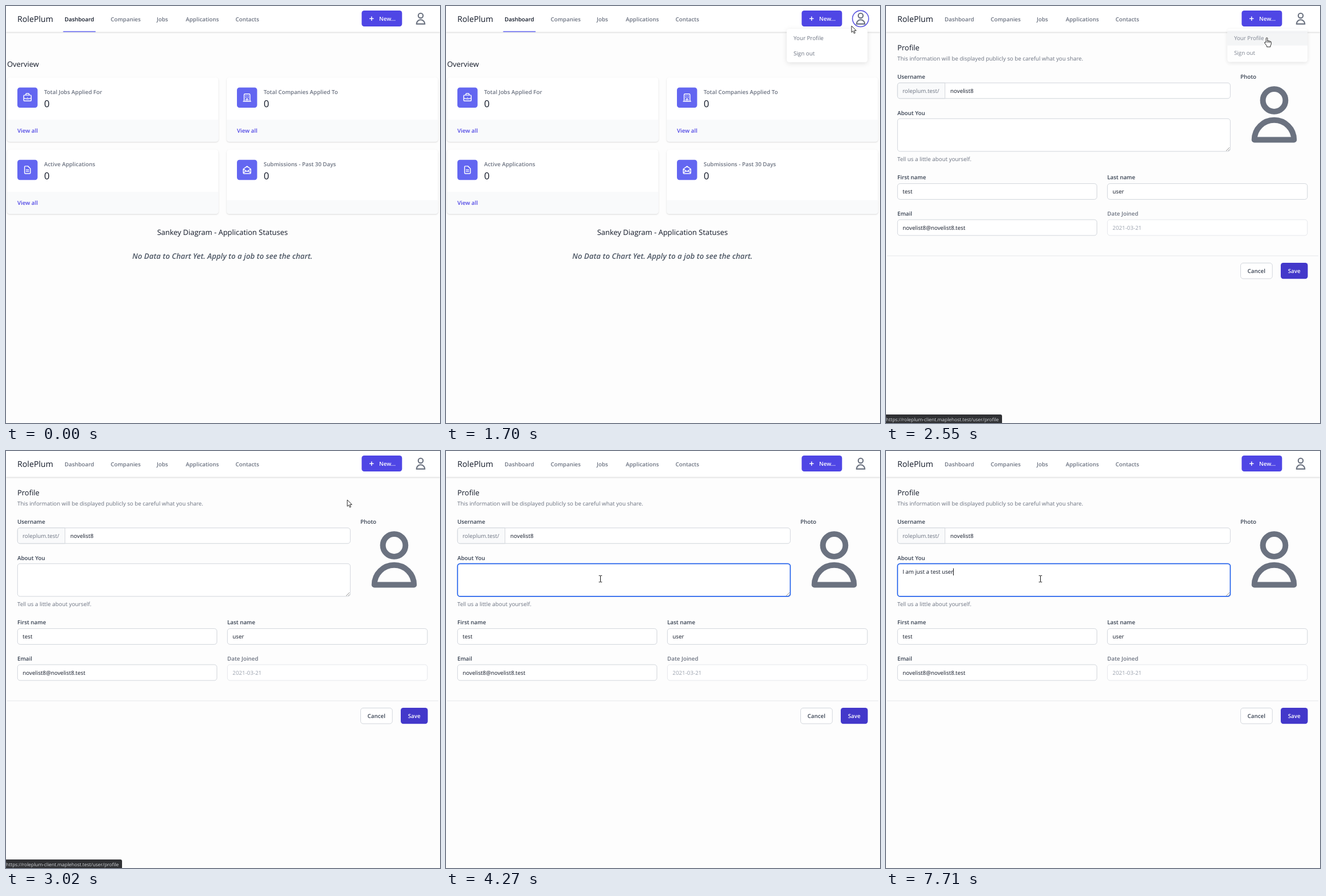
An HTML page that plays this animation: 763 by 734 pixels, repeating every 8000 ms.

```html
<!DOCTYPE html>
<html lang="en">
<head>
<meta charset="utf-8">
<title>Job tracker profile</title>
<style>
  html, body { margin: 0; width: 100%; height: 100%; overflow: hidden; background: #fdfdfd; }
  svg { display: block; }
  text { font: 400 9.8px "Open Sans", "Noto Sans", sans-serif; fill: #111827; text-rendering: geometricPrecision; }
  .label { font-weight: 600; font-size: 9.82px; fill: #374151; }
  .muted { fill: #6b7280; }
  .faint { fill: #9ca3af; }
  .dark { fill: #111827; }
  .link { fill: #4f46e5; }
  .light { fill: #fff; }
  .head { font-weight: 500; font-size: 12.95px; }
  .brand { font-weight: 500; font-size: 14.2px; }
  .count { font-weight: 500; font-size: 16.8px; }
  .empty { font-weight: 600; font-style: italic; font-size: 13.3px; fill: #4b5563; }
  .url { font-size: 8.45px; fill: #d5d8dc; }
  .mid { text-anchor: middle; }
  .card { filter: drop-shadow(0 1px 1px rgba(0,0,0,.14)); }
  .popup { filter: drop-shadow(0 2px 4px rgba(0,0,0,.11)); }
  .icon { fill: none; stroke-width: 2; stroke-linecap: round; stroke-linejoin: round; }
</style>
</head>
<body>
<svg id="stage" width="763" height="734" viewBox="0 0 763 734"></svg>
<script>
const LOOP = 8000;
const stage = document.getElementById('stage');

const text = (x, y, str, cls = '') => `<text x="${x}" y="${y}" class="${cls}">${str}</text>`;
const box = (x, y, w, h, fill, r = 0, stroke = 'none') =>
  `<rect x="${x}" y="${y}" width="${w}" height="${h}" rx="${r}" fill="${fill}" stroke="${stroke}"/>`;
const icon = (x, y, scale, d, color) =>
  `<path class="icon" transform="translate(${x} ${y}) scale(${scale})" stroke="${color}" d="${d}"/>`;

const ICONS = {
  user: 'M16 7a4 4 0 1 1-8 0 4 4 0 0 1 8 0zM12 14a7 7 0 0 0-7 7h14a7 7 0 0 0-7-7z',
  briefcase: 'M21 13.25A24 24 0 0 1 12 15a24 24 0 0 1-9-1.75M16 6V4a2 2 0 0 0-2-2h-4a2 2 0 0 0-2 2v2m4 6h.01M5 20h14a2 2 0 0 0 2-2V8a2 2 0 0 0-2-2H5a2 2 0 0 0-2 2v10a2 2 0 0 0 2 2z',
  building: 'M19 21V5a2 2 0 0 0-2-2H7a2 2 0 0 0-2 2v16M3 21h18M9 7h1m-1 4h1m4-4h1m-1 4h1m-5 10v-5a1 1 0 0 1 1-1h2a1 1 0 0 1 1 1v5',
  document: 'M9 12h6m-6 4h6m2 5H7a2 2 0 0 1-2-2V5a2 2 0 0 1 2-2h6l6 6v10a2 2 0 0 1-2 2z',
  mail: 'M3 19v-9l9-6.6 9 6.6v9a2 2 0 0 1-2 2H5a2 2 0 0 1-2-2l6.75-4.5M21 19l-6.75-4.5M3 10l9 6 9-6'
};

function card(x, y, glyph, title, footer) {
  const h = 113.3, w = 371.5, f = y + footer;
  return `<g class="card">${box(x, y, w, h, '#fff', 5)}
    <path d="M${x} ${f}h${w}V${y + h - 5}q0 5-5 5H${x + 5}q-5 0-5-5z" fill="#f9fafb"/></g>`
    + box(x + 18, y + 18, 35.5, 35.5, '#6366f1', 4.5)
    + icon(x + 27, y + 27, .73, ICONS[glyph], '#fff')
    + text(x + 65, y + 29.5, title, 'label muted')
    + text(x + 65, y + 52, '0', 'count')
    + (footer < 80 ? text(x + 18, y + 97.5, 'View all', 'label link') : '');
}

function field(x, y, w, label, value, disabled) {
  return text(x, y - 7, label, disabled ? 'label muted' : 'label')
    + box(x + .3, y + .3, w, 27.8, '#fff', 4.5, disabled ? '#e5e7eb' : '#d1d5db')
    + text(x + 9.3, y + 18, value, disabled ? 'faint' : '');
}

const nav = `<g style="filter:drop-shadow(0 1px 1px rgba(0,0,0,.16))">${box(0, 0, 763, 45.7, '#fff')}</g>`
  + text(20, 28, 'RolePlum', 'brand')
  + [[184, 'Companies'], [265, 'Jobs'], [316, 'Applications'], [403.5, 'Contacts']]
      .map(([x, name]) => text(x, 26.7, name, 'label muted')).join('')
  + '<text id="tab" x="103" y="26.7">Dashboard</text>'
  + `<g id="underline">${box(100.5, 44.3, 57, 1.5, '#6366f1')}</g>`
  + box(625.3, 8, 71, 28, '#4f46e5', 4.5)
  + '<path d="M639 22.2h7.4M642.7 18.5v7.4" stroke="#fff" stroke-width="1.5"/>'
  + text(656, 25.7, 'New...', 'label light')
  + icon(716.4, 9.6, 1.05, ICONS.user, '#6b7280')
  + '<circle id="ring" cx="728.8" cy="22.3" r="14.2" fill="none" stroke="#5b57e0" stroke-width="1.6"/>';

const dashboard = text(2, 107, 'Overview', 'head')
  + card(2, 125.5, 'briefcase', 'Total Jobs Applied For', 74.5)
  + card(388, 125.5, 'building', 'Total Companies Applied To', 74.5)
  + card(2, 252.7, 'document', 'Active Applications', 74.5)
  + card(388, 252.7, 'mail', 'Submissions - Past 30 Days', 89)
  + text(380.5, 403, 'Sankey Diagram - Application Statuses', 'head mid')
  + text(380.5, 444.5, 'No Data to Chart Yet. Apply to a job to see the chart.', 'empty mid');

const profile = text(20, 77.5, 'Profile', 'head')
  + text(20, 95.5, 'This information will be displayed publicly so be careful what you share.', 'muted')
  + text(20, 128, 'Username', 'label')
  + box(20.3, 135.3, 585, 27.5, '#fff', 4.5, '#d1d5db')
  + '<path d="M103.7 135.3H24.8q-4.5 0-4.5 4.5v18.5q0 4.5 4.5 4.5h78.9z" fill="#f9fafb" stroke="#d1d5db"/>'
  + text(29, 152.6, 'roleplum.test/', 'muted')
  + text(113, 152.6, 'novelist8')
  + text(623, 128, 'Photo', 'label')
  + icon(622.8, 131.2, 4.97, ICONS.user, '#6b7280')
  + text(20, 191.5, 'About You', 'label')
  + '<rect id="about" x="20.3" y="198.3" width="585" height="57.6" rx="4.5" fill="#fff"/>'
  + '<path d="M598 255l6-6M601.5 255l2.5-2.5" stroke="#777" stroke-width=".8"/>'
  + '<text id="typed" x="29" y="216.2"></text><path id="caret" d="M0 206.5v12.5" stroke="#111"/>'
  + text(20, 273, 'Tell us a little about yourself.', 'muted')
  + field(20, 312.3, 350.5, 'First name', 'test')
  + field(389, 312.3, 351.5, 'Last name', 'user')
  + field(20, 375.8, 350.5, 'Email', 'novelist8@novelist8.test')
  + field(389, 375.8, 351.5, 'Date Joined', '2021-03-21', true)
  + box(2, 439.3, 758, 1, '#e5e7eb')
  + box(623.5, 452.4, 55.7, 27.6, '#fff', 4.5, '#d1d5db')
  + text(651.3, 470, 'Cancel', 'label mid')
  + box(694, 452, 47.5, 28.2, '#4338ca', 4.5)
  + text(717.7, 470, 'Save', 'label light mid');

const menu = `<g class="popup">${box(599, 40.3, 142, 58.7, '#fff', 4.5)}</g>
  <g id="hover">${box(599, 43.5, 142, 26.3, '#f3f4f6')}</g>`
  + text(611, 60, 'Your Profile', 'muted') + text(611, 86.7, 'Sign out', 'muted');

const status = '<path d="M0 719h201q3 0 3 3v12H0z" fill="#303134"/>'
  + text(0, 730.5, 'https://roleplum-client.maplehost.test/user/profile', 'url');

const pointers = {
  arrow: '<path d="M0 0v11.4l2.6-2.4 1.8 4.2 1.9-.8-1.8-4.1h3.7z" fill="#fff" stroke="#111" stroke-width=".9"/>',
  hand: '<path d="M-1.3 8V1.2q0-1.4 1.3-1.4t1.3 1.4v4.4q1-.9 2.2.2 1.2-.7 2 .4 2.2-.2 2.2 1.8v3.4l-1.4 2.6v2H0v-1.8l-3.8-5q-.6-1.7 1-1.6z" fill="#fff" stroke="#111" stroke-width=".9"/><path d="M1.3 5v4M3.5 6v3M5.5 6.5v2.5" stroke="#111" stroke-width=".7"/>',
  beam: '<path d="M-2.8-5.7H-.8L0-5.2l.8-.5h2M-2.8 5.7h2L0 5.2l.8.5h2M0-5.2V5.2" fill="none" stroke="#111"/>'
};

stage.innerHTML = box(0, 0, 763, 734, '#fdfdfd')
  + `<g id="dashboard">${dashboard}</g><g id="profile">${profile}</g>${nav}
  <g id="menu">${menu}</g><g id="status">${status}</g><g id="cursor">`
  + Object.entries(pointers).map(([id, art]) => `<g id="${id}">${art}</g>`).join('') + '</g>';

const el = {};
stage.querySelectorAll('[id]').forEach(node => el[node.id] = node);
const show = (id, on) => el[id].setAttribute('display', on ? 'inline' : 'none');

// first step, last step, number of steps, control point, end point
const MOVES = [
  [130, 360, 4, 645, 500, 622, 351],
  [510, 1140, 9, 594, 190, 726, 27],
  [1615, 1700, 2, 722, 28, 713, 35],
  [1770, 2080, 5, 690, 48, 669.5, 56],
  [2860, 3020, 3, 640, 66, 600, 86],
  [3090, 3570, 7, 390, 190, 274.5, 231],
  [3720, 3800, 2, 273, 228, 271.5, 225]
];

function cursorAt(t) {
  let x = 697, y = 750;
  for (const [from, to, steps, cx, cy, ex, ey] of MOVES) {
    if (t < from) break;
    const done = Math.floor((t - from) / (to - from) * (steps - 1) + 1e-6) + 1;
    const u = Math.min(1, done / steps), v = 1 - u;
    if (u === 1) [x, y] = [ex, ey];
    else return [v * v * x + 2 * u * v * cx + u * u * ex, v * v * y + 2 * u * v * cy + u * u * ey];
  }
  return [x, y];
}

const TYPING = [
  [4960, 'I'], [5110, ' '], [5270, 'a'], [5430, 'm'], [5520, ' '], [5670, 'j'],
  [5910, 'u'], [5990, 's'], [6070, 't '], [6230, 'a'], [6310, ' '],
  [6470, 't'], [6545, 'e'], [6620, 's'], [6790, 't'], [6850, ' '],
  [7480, 'u'], [7630, 's'], [7710, 'er']
];

// start, opacity, scale
const MENU = [[0, 0, 1], [1458, .5, .975], [1536, 1, 1], [2550, .88, .992], [2650, 0, 1]];

const within = (t, a, b) => t >= a && t < b;

function render(t) {
  const onProfile = t >= 2550;
  show('dashboard', !onProfile);
  show('profile', onProfile);
  show('underline', !onProfile);
  el.tab.setAttribute('class', onProfile ? 'label muted' : 'label dark');
  show('ring', within(t, 1380, 2470));
  show('status', within(t, 2230, 3250));

  const [, opacity, scale] = MENU.findLast(step => t >= step[0]);
  el.menu.setAttribute('opacity', opacity);
  el.menu.setAttribute('transform', `translate(741 40) scale(${scale}) translate(-741 -40)`);

  const [x, y] = cursorAt(t);
  const overItem = within(t, 1536, 2860) && y > 43;
  const overField = onProfile && x < 605 && (within(y, 198, 256) || (x > 104 && within(y, 135, 163)));
  const kind = overItem ? 'hand' : overField ? 'beam' : 'arrow';
  show('hover', overItem);
  Object.keys(pointers).forEach(id => show(id, id === kind));
  show('cursor', t >= 130);
  el.cursor.setAttribute('transform', `translate(${x} ${y})`);

  const focused = t >= 3880;
  el.about.setAttribute('stroke', focused ? '#2563eb' : '#d1d5db');
  el.about.setAttribute('stroke-width', focused ? 1.7 : 1);
  const typed = TYPING.filter(([at]) => t >= at).map(([, s]) => s).join('').replace(/ /g, '\u00a0');
  if (el.typed.textContent !== typed) el.typed.textContent = typed;
  show('caret', focused && !within(t, 4270, 4730) && !within(t, 7390, 7480));
  const width = typed && onProfile ? el.typed.getComputedTextLength() : 0;
  el.caret.setAttribute('transform', `translate(${Math.floor(29 + width) + .5} 0)`);
}

const start = performance.now();
function tick() {
  render((performance.now() - start) % LOOP);
  requestAnimationFrame(tick);
}
tick();
</script>
</body>
</html>
```
